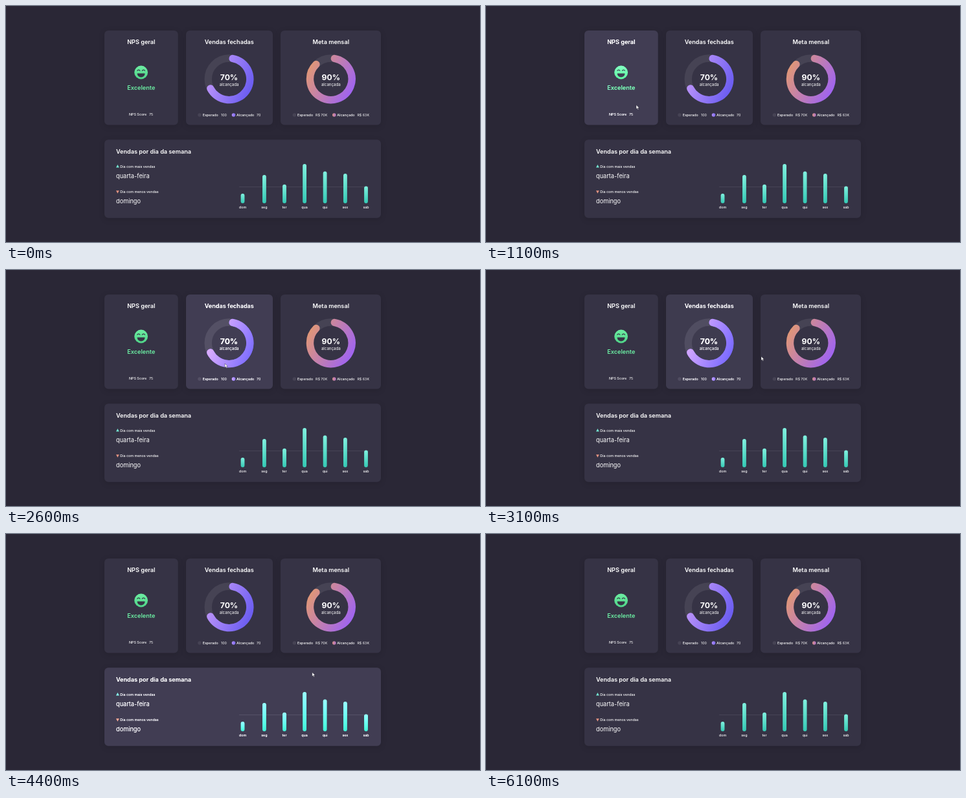
Animation of 732 by 366 pixels, one loop 6400 ms. Source, as an HTML page:

```html
<!DOCTYPE html>
<html lang="pt-BR">
<head>
<meta charset="utf-8">
<title>Painel de vendas</title>
<style>
  html, body { margin: 0; width: 100%; height: 100%; overflow: hidden; background: #2a2736; }
  svg { display: block; width: 732px; height: 366px; font-family: Inter, "Open Sans", sans-serif; fill: #fff; }
  .card { --lit: 0; filter: brightness(calc(1 + .2 * var(--lit))) drop-shadow(0 2px 4px rgba(0, 0, 0, .13)); }
  .panel { fill: #363345; }
  .title { font-size: 9.15px; font-weight: 600; }
  .big { font-size: 9.2px; }
  .percent { font-size: 12.2px; font-weight: 700; }
  .sub { font-size: 6.15px; }
  .label { font-size: 5.35px; font-weight: 500; }
  .value { font-size: 5.35px; }
  .mid { text-anchor: middle; }
  .ring { fill: none; stroke-width: 11.4; stroke-linecap: round; }
  .track { stroke: #464354; }
</style>
</head>
<body>
<svg viewBox="0 0 732 366">
  <defs>
    <linearGradient id="violet" gradientUnits="userSpaceOnUse" x1="-32" y1="-13" x2="34" y2="15">
      <stop stop-color="#c298f9"/><stop offset="1" stop-color="#6b5df1"/>
    </linearGradient>
    <linearGradient id="sunset" gradientUnits="userSpaceOnUse" x1="-32" y1="-20" x2="34" y2="17">
      <stop stop-color="#df9678"/><stop offset="1" stop-color="#a064f0"/>
    </linearGradient>
    <linearGradient id="violetDot"><stop stop-color="#b48ff7"/><stop offset="1" stop-color="#7868f1"/></linearGradient>
    <linearGradient id="sunsetDot"><stop stop-color="#d99084"/><stop offset="1" stop-color="#b072cc"/></linearGradient>
    <linearGradient id="teal" x2="0" y2="1"><stop stop-color="#81f1df"/><stop offset="1" stop-color="#34c9b4"/></linearGradient>
    <linearGradient id="green" x2="0" y2="1"><stop stop-color="#6deda2"/><stop offset="1" stop-color="#4fd488"/></linearGradient>
  </defs>

  <g class="card">
    <rect class="panel" x="152" y="38" width="113.7" height="146.5" rx="6"/>
    <text class="title mid" x="208.8" y="59">NPS geral</text>
    <g transform="translate(208.6 103)">
      <circle r="10.4" fill="url(#green)"/>
      <path d="M-6 1.6H6A6 6 0 0 1 -6 1.6Z" fill="#363345"/>
      <path d="M-6 -2.2a2.3 2.3 0 0 1 4.4 0M1.6 -2.2a2.3 2.3 0 0 1 4.4 0" fill="none" stroke="#363345" stroke-width="1.1"/>
    </g>
    <text class="title mid" x="208.8" y="129.7" fill="#6cefa4">Excelente</text>
    <text class="label" x="190" y="169.8">NPS Score</text>
    <text class="value" x="221" y="169.8">75</text>
  </g>

  <g class="card">
    <rect class="panel" x="278" y="38" width="134" height="146.5" rx="6"/>
    <text class="title mid" x="344.8" y="59">Vendas fechadas</text>
    <g transform="translate(344.5 113.3)">
      <circle class="ring track" r="32.3"/>
      <path class="ring" data-share=".7" stroke="url(#violet)"/>
    </g>
    <text class="percent mid" x="344.5" y="115.2">70%</text>
    <text class="sub mid" x="344.6" y="123.5">alcançada</text>
    <circle cx="299" cy="169" r="2.8" fill="#464354"/>
    <text class="label" x="303.7" y="170.9">Esperado</text>
    <text class="value" x="332" y="170.9">100</text>
    <circle cx="351.5" cy="169" r="2.8" fill="url(#violetDot)"/>
    <text class="label" x="356" y="170.9">Alcançado</text>
    <text class="value" x="387" y="170.9">70</text>
  </g>

  <g class="card">
    <rect class="panel" x="424" y="38" width="155" height="146.5" rx="6"/>
    <text class="title mid" x="501.8" y="59">Meta mensal</text>
    <g transform="translate(501.8 113.3)">
      <circle class="ring track" r="32.3"/>
      <path class="ring" data-share=".9" stroke="url(#sunset)"/>
    </g>
    <text class="percent mid" x="501.8" y="115.2">90%</text>
    <text class="sub mid" x="501.8" y="123.5">alcançada</text>
    <circle cx="445.4" cy="169" r="2.8" fill="#464354"/>
    <text class="label" x="450" y="170.9">Esperado</text>
    <text class="value" x="478" y="170.9">R$ 70K</text>
    <circle cx="506.8" cy="169" r="2.8" fill="url(#sunsetDot)"/>
    <text class="label" x="511.3" y="170.9">Alcançado</text>
    <text class="value" x="542.4" y="170.9">R$ 63K</text>
  </g>

  <g class="card">
    <rect class="panel" x="152" y="207.2" width="427" height="121.6" rx="6"/>
    <text class="title" x="170" y="228.6">Vendas por dia da semana</text>
    <path d="M170 250.6L172.4 246L174.8 250.6Z" fill="#74e8d4"/>
    <text class="label" x="176.3" y="251.1">Dia com mais vendas</text>
    <text class="big" x="170" y="267">quarta-feira</text>
    <path d="M170 286.2H174.8L172.4 290.8Z" fill="#e59380"/>
    <text class="label" x="176.3" y="289.9">Dia com menos vendas</text>
    <text class="big" x="170" y="305.5">domingo</text>
    <path d="M360 280.5H560" stroke="#4c495b" stroke-width=".8"/>
    <g id="bars"></g>
  </g>

  <path id="cursor" d="M0 0V6.2L1.5 4.9L2.6 7.2L3.6 6.7L2.6 4.6H4.5Z" stroke="#1c1a26" stroke-width=".4" visibility="hidden"/>
</svg>
<script>
  const LOOP = 6400, STEP = 100, FADE = 200;
  const clamp = v => Math.min(1, Math.max(0, v));

  // Arcs keep a small gap at both ends of their share of the circle.
  const onRing = deg => {
    const a = deg * Math.PI / 180;
    return `${32.3 * Math.sin(a)} ${-32.3 * Math.cos(a)}`;
  };
  for (const arc of document.querySelectorAll('[data-share]')) {
    const end = arc.dataset.share * 360 - 9;
    arc.setAttribute('d', `M${onRing(10)}A32.3 32.3 0 1 1 ${onRing(end)}`);
  }

  // Day, bar centre, bar top
  const days = [
    ['dom', 365.5, 291], ['seg', 398.9, 262], ['ter', 430, 276.8], ['qua', 461.1, 245],
    ['qui', 492.6, 256.4], ['sex', 523.9, 260], ['sab', 556, 279.4]
  ];
  document.getElementById('bars').innerHTML = days.map(([day, x, top]) =>
    `<rect x="${x - 2.9}" y="${top}" width="5.8" height="${306 - top}" rx="2.9" fill="url(#teal)"/>
     <text class="label mid" x="${x}" y="313.9">${day}</text>`).join('');

  // When the pointer enters and leaves each card
  const hovers = [[650, 1400], [2200, 3050], [3100, 3900], [4200, 5400]];

  // Pointer path: time, x, y
  const path = [
    [400, 52, 84], [700, 160, 126], [900, 217, 149], [1100, 232, 153.5], [1300, 231, 176],
    [1500, 236, 200], [1700, 244, 196], [2000, 258, 187], [2200, 279, 171], [2400, 318, 153],
    [2600, 338, 145], [2700, 338, 145], [2800, 350, 143], [3000, 400, 135], [3200, 450, 133],
    [3400, 484, 142], [3700, 495, 167], [3900, 491.5, 185], [4100, 483, 201], [4200, 479, 207.5],
    [4400, 472.8, 214.5], [4800, 410, 233], [5100, 300, 230], [5400, 179, 200.5], [5500, 132, 196],
    [5700, 45, 184], [5800, 10, 180]
  ];
  const cards = document.querySelectorAll('.card');
  const cursor = document.getElementById('cursor');

  function pointerAt(t) {
    const i = path.findIndex(key => key[0] > t);
    const [t0, x0, y0] = path[i - 1], [t1, x1, y1] = path[i];
    const k = (t - t0) / (t1 - t0);
    return [x0 + (x1 - x0) * k, y0 + (y1 - y0) * k];
  }

  function draw() {
    const t = Math.floor(performance.now() % LOOP / STEP) * STEP;
    hovers.forEach(([enter, leave], i) => {
      cards[i].style.setProperty('--lit', clamp((t - enter) / FADE) - clamp((t - leave) / FADE));
    });
    const shown = t >= 400 && t < 5800;
    cursor.setAttribute('visibility', shown ? 'visible' : 'hidden');
    if (shown) cursor.setAttribute('transform', `translate(${pointerAt(t)})`);
    requestAnimationFrame(draw);
  }
  draw();
</script>
</body>
</html>
```
